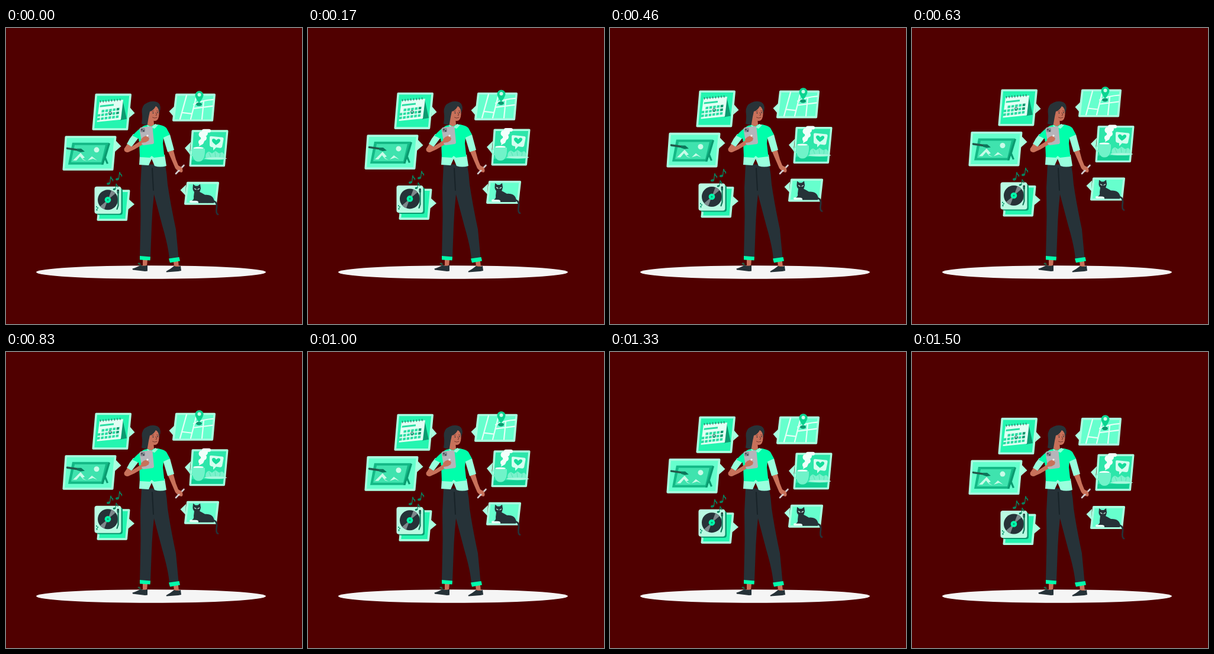
An HTML page for the animation above (1.54 s loop, 500x500 px).

```html
<!DOCTYPE html>
<html>
<head>
<meta charset="utf-8">
<style>
html, body { margin: 0; width: 100%; height: 100%; overflow: hidden; background: #500000; }
svg { display: block; width: 100vw; height: 100vh; }
.card { fill: #66ffcd; stroke: #a9ffe0; stroke-width: 3.6; stroke-linejoin: round; }
.vivid { fill: #24f5b0; }
.tip { fill: #a9ffe0; }
.pale { fill: #c9fbe8; }
.mint { fill: #00ffab; }
.mid { fill: #2bdda3; }
.deep { fill: #0b9b70; }
.dark { fill: #263238; }
.skin { fill: #c8715a; }
.sleeve { fill: #99ffdd; }
.line { fill: none; stroke-linecap: round; stroke-linejoin: round; }
</style>
</head>
<body>
<svg viewBox="0 0 500 500">
<defs>
  <g id="note">
    <ellipse rx="3" ry="2" transform="rotate(-15)"/>
    <path d="M1.7 0L3.2-12L5-12Q5-9 8-7.5Q9-5 7-3Q7.5-6 4-8L3 0Z"/>
  </g>
</defs>
<ellipse cx="245" cy="412.500" rx="194" ry="11.300" fill="#f5f5f5"/>

<g id="cards">
  <!-- calendar -->
  <path class="tip" d="M209 134L217.500 144L208 152Z"/>
  <path class="card vivid" d="M152.300 112.800H210.200L204.500 171.200H147.300Z"/>
  <path class="deep" d="M197 122L204 154L193 156Z"/>
  <path d="M158 125L198 121.500L194 155L153.500 159Z" fill="#e2fff4"/>
  <path class="mid" d="M159 131L182 128.500V131.500L158.500 134Z"/>
  <g id="days"></g>
  <circle class="line" cx="176" cy="144" r="2.500" stroke="#263238" stroke-width=".8"/>
  <path class="line" d="M159 124.500L197 121" stroke="#263238" stroke-width="4" stroke-dasharray=".8 4" style="stroke-linecap:butt"/>

  <!-- drawing -->
  <path class="tip" d="M184 189L194.500 200L183 210Z"/>
  <path class="card" d="M101.300 184.200H184.700L179.700 239.200H97.300Z"/>
  <path d="M112 194H173L164.500 231H105Z" fill="#14b986"/>
  <path class="deep" d="M173 194L176 195.500L169 219L173 229L170 230L167 223L164.500 231H161Z"/>
  <path d="M116 198H168L161 227H110Z" fill="#3fe3ae"/>
  <path class="pale" d="M113 224L126 211L133 219L129 221L136 225L130 223L125 217L119 224Z"/>
  <path class="pale" d="M138 224L145 217L154 224L147 221Z"/>
  <circle class="pale" cx="153" cy="206" r="4.500"/>
  <path class="line" d="M103.500 203.500L121 206" stroke="#24584b" stroke-width="3.400"/>
  <path d="M120 204L127 204L133 209L126 210L120 208Z" fill="#0c775b"/>

  <!-- turntable -->
  <path class="tip" d="M207 289L217 298L206 307Z"/>
  <path class="card vivid" d="M160.300 275.300H207.700L203.200 324.200H155.300Z"/>
  <rect class="deep" x="153" y="271" width="44" height="45" rx="4"/>
  <rect x="149.500" y="268" width="45" height="46" rx="4" fill="#b9fae2"/>
  <circle class="dark" cx="172" cy="290.500" r="17"/>
  <path d="M172 290.500L178 274.600A17 17 0 0 1 185 279.500ZM172 290.500L159 301.500A17 17 0 0 0 166 306.400Z" fill="#7d888b"/>
  <circle class="mint" cx="172" cy="290.500" r="5.300"/>
  <circle class="deep" cx="172" cy="290.500" r="1.500"/>
  <rect class="dark" x="187.500" y="273" width="3.500" height="7" rx="1.500"/>
  <path class="line" d="M189.500 276V300L187.500 306" stroke="#14795c" stroke-width="2.200"/>
  <path class="line" d="M153 302V302.500M155 304V304.500M153.500 306.500V308" stroke="#0b9b70" stroke-width="2"/>
  <g fill="#08815d">
    <use href="#note" x="173" y="263"/>
    <use href="#note" x="188" y="255.500"/>
    <use href="#note" transform="translate(183 272.500) scale(.8)"/>
  </g>

  <!-- map -->
  <path class="tip" d="M285 132L275.500 141L284 151Z"/>
  <path class="card" d="M287.800 112.800H352.200L348.300 156.200H282.800Z"/>
  <path class="line" d="M305 114L294 154M322 114L312 154M297 143L314 145M317 129Q332 122 350 121M317 136L349 132M334 124L331 154" stroke="#e4fff6" stroke-width="2.200"/>
  <ellipse class="deep" cx="326" cy="129" rx="5" ry="3"/>
  <path d="M326 127Q319.500 118 319.500 113.500A7 7 0 0 1 333.500 113.500Q333 119 326 127Z" fill="#0bd490"/>
  <circle class="pale" cx="326.500" cy="113" r="3"/>

  <!-- coffee -->
  <path class="tip" d="M312 193L302 203L310 213Z"/>
  <path class="card" d="M315.300 174.300H373.700L368.200 232.700H311.300Z"/>
  <path d="M317 176H372L367 231H313Z" fill="#2de6aa"/>
  <path d="M314 223H367L366 231H313Z" fill="#12cf94"/>
  <g fill="#f2fffb">
    <rect x="331" y="171" width="15" height="6" rx="3"/>
    <circle cx="331" cy="180" r="5.500"/><circle cx="336" cy="178" r="5"/>
    <circle cx="334" cy="186" r="5"/><circle cx="329" cy="193" r="4"/>
    <path d="M328 188L337 187L333 196L326 200Z"/>
    <ellipse cx="325" cy="203" rx="9" ry="2"/>
  </g>
  <circle class="line" cx="315" cy="211" r="4.500" stroke="#83f5cf" stroke-width="2"/>
  <path d="M314 204H336Q337 226 325 226Q314 226 314 204Z" fill="#70f3c9"/>
  <path d="M346 183L366 185Q368 186 367.500 188L365 201Q364 203 362 203L355 202L350 207V202L346 201Q344 200 344 198V185Q344 183 346 183Z" fill="#d3fff0"/>
  <path d="M354.500 198Q345 191 349 187.500Q353 186 355 190Q359 185.500 362 189Q363 193 354.500 198Z" fill="#16dc9b"/>
  <path d="M337 219Q337 210 343 209L348 212L354 208L360 212L365 210Q370 213 369 220Z" fill="#7bf2cc"/>
  <path class="line" d="M343 211L346 218M353 210L354 218M362 212L361 218" stroke="#55e6b5"/>
  <ellipse cx="354" cy="220.500" rx="19" ry="2" fill="#a9f8de"/>

  <!-- cat -->
  <path class="tip" d="M304 265L294.500 274L303 283Z"/>
  <path class="card" d="M306.800 261.800H358.200L354.200 297.200H302.800Z"/>
  <rect x="310" y="291.500" width="16" height="4" rx="2" fill="#e8fff7"/>
  <path class="dark" d="M316 264L320 267H324L328 264L329 271Q328 276 327 277Q331 279 336 282Q350 281 352 293L351 296H325Q326 292 320 292H314Q318 290 317 285L318 277Q315 274 315.500 270Z"/>
  <path class="line" d="M340 294Q357 289 356 302Q354 314 358 315" stroke="#263238" stroke-width="2.800"/>
  <path class="line" d="M318.500 271.500L321 273M324 273L326.500 271.500" stroke="#c9fbe8" stroke-width="1.200"/>
</g>

<!-- legs -->
<path class="skin" d="M231 391H239L238 403H231ZM283 394H291L292 404H284Z"/>
<path class="dark" d="M213.500 406.500Q222 404 227 400.500Q233 403 239 400.500V410.500L235 411L214 408.500ZM270.500 411Q278 407 284 402Q289 404 295 402L296 410L291 411L271 412.500Z"/>
<path class="line" d="M223 398L228 401M224 397L227 398" stroke="#0b9b70"/>
<path class="dark" d="M229 230L269 231Q272 247 273 264Q278 298 287 340L291.500 388L276 390Q274 368 264 334L250 281Q247 307 246 335L244 387L226 386Q227 350 227.500 318L227 270Z"/>
<path class="line" d="M247 237L249 274" stroke="#182328" stroke-width="2"/>
<path class="mint" d="M226 385L244 386.500L243.500 392.500L226 391.500ZM275 389.500L292.500 387L294 393.500L277 396.500Z"/>

<!-- right arm -->
<path class="skin" d="M273 207L282 204L287 222L291 232L297 236Q300 241 297 244L292 243L286 237Z"/>
<path class="line" d="M287 246L300.500 232" stroke="#cfcfd2" stroke-width="2.600"/>
<path class="skin" d="M289 235L295 234L298 237L296 241L290 239Z"/>
<path class="sleeve" d="M265 183L277 180L284 206L273 209.500Z"/>

<!-- torso -->
<path class="sleeve" d="M226 215L268 214L271 233Q260 236 251 233L246 221L241 232L225 231Z"/>
<path class="sleeve" d="M215 179L225 184L212 201L204 196Q208 187 215 179Z"/>
<path class="mint" d="M233 165L243 163L257 163Q268 165 271 169L277 180L266 185L265 195L267.500 217L250 219L246 216L243 219L226 218L225 193L224 187L213.500 182Q222 172 233 165Z"/>

<!-- head -->
<path d="M239 126Q248 122 256 125.500Q262 130 260.500 138L257 150L246 154L243 163Q235 165 229 161.500Q231 151 229.500 142Q229 130 239 126Z" fill="#283338"/>
<path class="skin" d="M239 151H249L250 163Q245 169 239 163Z"/>
<path class="skin" d="M242 140Q250 138 253 132Q259 135 258.500 146Q258 156 252 157Q245 157 241 151Q237 144 242 140Z"/>
<path d="M253 129Q251 139 243 141L241 150L239 162L229.500 162Q233 146 230 138Q239 124 253 129ZM251 128Q258 131 259.500 140Q262 133 258 127Z" fill="#283338"/>
<path class="line" d="M247 141L249.500 140M254.500 140L257 140.500M253 143L255 147L253 147.500M247.500 151Q251 153.500 255 151" stroke="#6b302a" stroke-width=".9"/>
<circle class="dark" cx="248.500" cy="143.500" r=".9"/><circle class="dark" cx="256" cy="143" r=".9"/>
<path d="M238 163L245 168L252 162L257 164L251 170L245 168L240 170Z" fill="#93ffd8"/>

<!-- left arm and phone -->
<path class="skin" d="M205 196L212 200.500L230 189L239 192L217 205L206 210Q199 210 199.500 204Z"/>
<path d="M228 168L244 166Q247 166 247.500 168L250 193Q250 195.500 248 196L233 198Q230 198 229.500 196L225.500 171Q225.500 168.500 228 168Z" fill="#b5b5ba"/>
<rect x="227" y="169" width="8" height="7" rx="2" fill="#898c94"/>
<path class="line" d="M229.500 171.500V172M232.500 173.500V174" stroke="#263238" stroke-width="2"/>
<path class="skin" d="M228 188L232 184L239 181.500Q242 182 240 184.500L242 186L241 190L236 193L229 194Z"/>
<circle cx="239" cy="182" r="1.800" fill="#eeeeef"/>
</svg>
<script>
const LOOP = 1540, STEP = LOOP / 38, LEAD = 30, TRAVEL = 9.3, BASE = .2;
const cards = document.getElementById('cards');

let days = '';
for (let row = 0; row < 3; row++) {
  for (let col = 0; col < 6; col++) {
    const x = 155.5 + col * 6.3 - row * .6, y = 139.5 - col * .8 + row * 6.3;
    if (row + col === 0) continue;
    const tone = col === 5 && row < 2 ? 'deep' : 'mid';
    days += `<path class="${tone}" d="M${x} ${y}l4.600-.5l-.5 4.200l-4.600 .5z"/>`;
  }
}
document.getElementById('days').innerHTML = days;

// The cards rise and sink at constant speed, in steps.
function draw(now) {
  const time = Math.floor(now / STEP) * STEP;
  const phase = (time + LEAD) / LOOP % 1;
  const lift = TRAVEL * (1 - Math.abs(1 - 2 * phase));
  cards.setAttribute('transform', `translate(0 ${BASE - lift})`);
  requestAnimationFrame(() => draw(performance.now() - start));
}
const start = performance.now();
draw(0);
</script>
</body>
</html>
```
